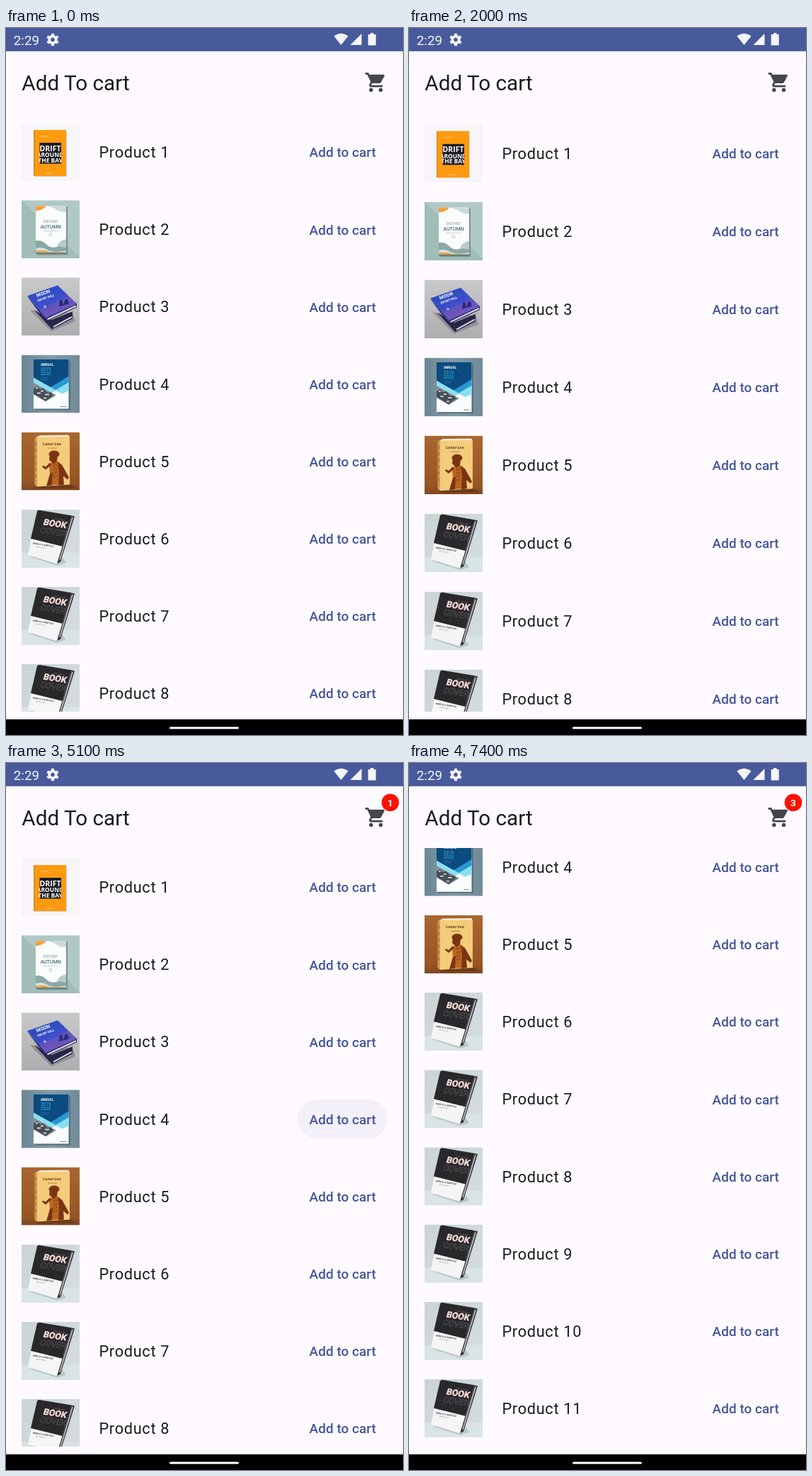
Write an HTML page that moves like this. It is 561x998 px and loops after 8 s.

```html
<!DOCTYPE html>
<html lang="en">
<head>
<meta charset="utf-8">
<title>Add To cart</title>
<style>
  html, body { margin: 0; width: 100%; height: 100%; overflow: hidden; background: #fefaff; }
  svg { display: block; }
  #stage { width: 561px; height: 998px; font-family: Roboto, sans-serif; }
  .name { font-size: 21.8px; letter-spacing: .66px; fill: #1b1b1f; }
  .add { font-size: 19px; font-weight: 500; fill: #45579a; }
  .mid { text-anchor: middle; }
  .bold { font-weight: 700; }
  .sans { font-family: "Open Sans", sans-serif; }
  .mono { font-family: "Liberation Mono", monospace; }
</style>
</head>
<body>
<svg id="stage" viewBox="0 0 561 998" xmlns="http://www.w3.org/2000/svg">
  <defs>
    <clipPath id="listArea"><rect y="120" width="561" height="845"/></clipPath>
    <linearGradient id="desk" x2="0" y2="1"><stop stop-color="#c9c8ca"/><stop offset="1" stop-color="#aeadb0"/></linearGradient>
    <linearGradient id="night" x1="0" y1="0" x2=".7" y2="1"><stop stop-color="#2449b4"/><stop offset=".55" stop-color="#3a4fcb"/><stop offset="1" stop-color="#8a58b4"/></linearGradient>
    <linearGradient id="slate" x2="1" y2="0"><stop stop-color="#6b8795"/><stop offset=".5" stop-color="#849ba7"/><stop offset="1" stop-color="#718a98"/></linearGradient>
    <linearGradient id="wood" x2="0" y2="1"><stop stop-color="#a8672f"/><stop offset=".85" stop-color="#965524"/><stop offset="1" stop-color="#7f461f"/></linearGradient>
    <linearGradient id="mist" x2="1" y2="1"><stop stop-color="#c9d4d5"/><stop offset="1" stop-color="#d6dde0"/></linearGradient>

    <symbol id="cover1" viewBox="0 0 82 82">
      <rect width="82" height="82" fill="#f7f5f7"/>
      <rect x="18" y="11" width="46" height="65" fill="#d9d3cd"/>
      <rect x="17" y="10" width="46" height="65" fill="#fd9a10"/>
      <path d="M17.700 10v65" stroke="#c9842c" stroke-width="1.200"/>
      <path d="M26 19h12M35 71h10" stroke="#ffc878" stroke-width="1"/>
      <svg x="24.500" y="28" width="31.500" height="29.500">
        <rect x="1" width="31" height="30" fill="#1d1b22"/>
        <g class="sans bold mid" fill="#fff" font-size="8.500">
          <text x="16" y="11.500" font-size="10.500">DRIFT</text>
          <text x="16" y="19.800">AROUND</text>
          <text x="16" y="27.600">THE BAY</text>
        </g>
      </svg>
    </symbol>

    <symbol id="cover2" viewBox="0 0 82 82">
      <rect width="82" height="82" fill="#b0c9c4"/>
      <path d="M0 0L82 80V82H0Z" fill="#a0bdb7"/>
      <path d="M22 9h43v68H22Z" fill="#78918f"/>
      <rect x="20" y="8" width="43" height="67" fill="#fbfcfc"/>
      <path d="M20 8h15q-4 6-15 7Z" fill="#f0a23c"/>
      <path d="M35 8h28v9q-9 0-14-4-6-4-14-5Z" fill="#ccdada"/>
      <path d="M20 57q9-1 15 5t13 4q8-2 15-1v10H20Z" fill="#8ba8a9"/>
      <path d="M50 64q4-8 13-9v12Z" fill="#b9cbcb"/>
      <path d="M20 68q9-3 17 2t26 1v4H20Z" fill="#d5dfde"/>
      <path d="M20 71h14l5 2h24v2H20Z" fill="#e9a347"/>
      <path d="M20 74h43v1.500H20Z" fill="#4d7686"/>
      <text class="mid" x="41" y="32" font-size="5" fill="#789199">DISTANT</text>
      <text class="mid" x="41" y="40" font-size="7" font-weight="500" fill="#416c7b">AUTUMN</text>
      <path d="M30 43.500h22" stroke="#bac8cc" stroke-width=".8"/>
      <circle cx="41" cy="49" r="1.800" fill="none" stroke="#9bb1b5" stroke-width=".7"/>
    </symbol>

    <symbol id="cover3" viewBox="0 0 82 82">
      <rect width="82" height="82" fill="url(#desk)"/>
      <path d="M12 46L42 76 76 62 72 50Z" fill="#918f95"/>
      <path d="M18 46L43 73 72 58V48L42 60Z" fill="#262747"/>
      <path d="M45 69.500L71 55.500" stroke="#d9d7df" stroke-width="2"/>
      <path d="M8 27L35 62 78 42V36L34 55Z" fill="#262a66"/>
      <path d="M36.500 59L77 40" stroke="#dddbe6" stroke-width="2"/>
      <path d="M8 26L51 11 78 37 34 57Z" fill="url(#night)"/>
      <path d="M34 57L25 46 66 26 78 37Z" fill="#7657b8" opacity=".5"/>
      <path d="M53 41l1-9 3-1 2 8 3-9 3 1 2 6Z" fill="#272b78"/>
      <g transform="rotate(-19 24 28)" fill="#fff" class="bold">
        <text x="22" y="27" font-size="6.800">MOON</text>
        <text x="21" y="33.500" font-size="4.600">ON MY HILL</text>
      </g>
      <circle cx="33" cy="41" r="1.800" fill="#aeb9f0"/>
    </symbol>

    <symbol id="cover4" viewBox="0 0 82 82">
      <rect width="82" height="82" fill="url(#slate)"/>
      <path d="M19 8h50v70H19Z" fill="#58707e"/>
      <rect x="17" y="6" width="49.500" height="70" fill="#fafcfd"/>
      <path d="M17 6h49.500v25L41 46 17 33Z" fill="#0b4b80"/>
      <path d="M66.500 30v9L48 50 41 46Z" fill="#2699d3"/>
      <path d="M66.500 39v12L57 55 48 50Z" fill="#8ae0f2"/>
      <path d="M17 32L49 50 42 54 17 39Z" fill="#8ae0f2"/>
      <path d="M17 39L49 57 34 66 17 56Z" fill="#8a9197"/>
      <path d="M17 47l5-3 4 4 5-1 5 6 6 0 3 4-11 8-17-10Z" fill="#484f56"/>
      <path d="M20 47h3M27 51h4M22 54h5M33 56h6M31 61h4" stroke="#d9dfe2" stroke-width="1.600"/>
      <path d="M55 73h8" stroke="#668899" stroke-width="1"/>
      <text x="27" y="15.500" font-size="4.600" class="bold" fill="#fff">ANNUAL</text>
      <g font-size="6.400" fill="#39b8df"><text x="27" y="23">2019</text><text x="27" y="29">2020</text></g>
      <path d="M27 32.500h12M27 35h10" stroke="#2b77a5" stroke-width=".8"/>
    </symbol>

    <symbol id="cover5" viewBox="0 0 82 82">
      <rect width="82" height="82" fill="url(#wood)"/>
      <path d="M16 74L70 74 78 79 24 80Z" fill="#6d3b19"/>
      <path d="M19 8L26 4.500 66 4 68 7Z" fill="#f4e8d5"/>
      <path d="M18.500 8L22 7V77L18.500 75Z" fill="#d29f55"/>
      <path d="M22 7L68 6.500V74L22 77Z" fill="#f5cb7c"/>
      <path d="M20 14v55" stroke="#8a5a2a" stroke-width="1" stroke-dasharray="5 4"/>
      <text class="mono bold mid" x="43" y="18" font-size="5.400" fill="#57310f">Lunarios</text>
      <path d="M37 22.500h13" stroke="#a47235" stroke-width=".8"/>
      <path d="M39 46L46 40 53 42 55 54 54 74 37 75 40 60Z" fill="#b9661f"/>
      <g fill="#7a3412">
        <ellipse cx="46" cy="31" rx="7.500" ry="5"/>
        <path d="M40 32L51 33 50 41 45 45 39 39Z"/>
        <path d="M51 42L57 46 67 64 65 67 59 62 60 74 52 75 53 56Z"/>
        <path d="M40 59L44 57 43 75 35 76Z"/>
        <path d="M42 46L34 53 29 49 30 47 34 49 40 43Z"/>
      </g>
      <path d="M46 46v18M49 45v18" stroke="#7a3412" stroke-width="1" stroke-dasharray="3 2"/>
    </symbol>

    <symbol id="cover6" viewBox="0 0 82 82">
      <rect width="82" height="82" fill="url(#mist)"/>
      <rect y="61" width="82" height="21" fill="#d9e4e4"/>
      <path d="M10 66L50 79 63 75 58 68Z" fill="#b9c6c8"/>
      <path d="M70 8.500L75 9.500 55 74 49 76.500Z" fill="#323235"/>
      <path d="M72 11L54 71" stroke="#c3c5c8" stroke-width="1.600"/>
      <path d="M22 2.500Q23 .5 26 1L71 8.500 50 76.500 9 64Z" fill="#f5f5f6"/>
      <path d="M22 2.500Q23 .5 26 1L71 8.500 57.500 52 13 41Z" fill="#29282b"/>
      <g transform="translate(30 21.500) rotate(9) skewX(-8)">
        <text x="12" y="-10" font-size="2.800" fill="#7c7a7d">TWO HALVES</text>
        <text class="bold" font-size="12.400" fill="#f8dcda" stroke="#f8dcda" stroke-width=".4">BOOK</text>
        <text x="-1" y="11.500" font-size="11.500" fill="none" stroke="#8c8a8f" stroke-width=".5" stroke-dasharray="1 1.200">COVER</text>
        <text x="-6" y="29" font-size="3.200" class="bold" fill="#3e3d42">HERE IS A SUBTITLE</text>
        <text x="0" y="33" font-size="2.400" fill="#88878c">WRITTEN BY</text>
      </g>
    </symbol>
  </defs>

  <rect width="561" height="998" fill="#fefaff"/>
  <g clip-path="url(#listArea)"><g id="list"></g></g>

  <rect width="561" height="32.800" fill="#485a9b"/>
  <g fill="#f4f5fb">
    <text x="10.800" y="23.500" font-size="18.800">2:29</text>
    <g transform="translate(66 16.500)" fill="none" stroke="#f4f5fb">
      <circle r="4.800" stroke-width="3.800"/>
      <circle r="7.300" stroke-width="3" pathLength="12" stroke-dasharray="1" stroke-dashoffset=".5" transform="rotate(30)"/>
    </g>
    <path d="M473.500 24L463.500 11.500Q473.500 4 483.500 11.500Z"/>
    <path d="M502.500 8V24H486.500Z"/>
    <path d="M515 7h4.500v2h3.200v15.500h-11V9h3.300Z"/>
  </g>
  <text x="22.300" y="88" font-size="29.700" fill="#1b1b1f">Add To cart</text>
  <path transform="translate(506.300 60.300) scale(1.364)" fill="#46454b" d="M7 18a2 2 0 1 0 0 4a2 2 0 0 0 0-4zM1 2v2h2l3.600 7.590-1.350 2.450C4.520 15.370 5.480 17 7 17h12v-2H7.420c-.14 0-.25-.11-.25-.25l.03-.12.9-1.630h7.450c.75 0 1.410-.41 1.750-1.030l3.580-6.490A1 1 0 0 0 20 4H5.210l-.94-2zM17 18a2 2 0 1 0 0 4a2 2 0 0 0 0-4z"/>
  <g id="badge">
    <circle cx="543" cy="55.800" r="12.300" fill="#fb1200"/>
    <text id="count" class="mid bold" x="543" y="61" font-size="13.600" fill="#fff"></text>
  </g>
  <use id="flyer" x="-41" y="-41" width="82" height="82"/>

  <rect y="974.500" width="561" height="1.500" fill="#dedce1"/>
  <rect y="976" width="561" height="22" fill="#000"/>
  <rect x="231" y="986.500" width="98" height="3" rx="1.500" fill="#fff"/>
</svg>
<script>
const LOOP = 8000, STEP = 100, PITCH = 109.14, ROWS = 11;
const $ = id => document.getElementById(id);

// [time, value] tables
const SCROLL = [[1300, 0], [1400, 5.6], [1500, 42], [1600, 92], [1700, 112], [1800, 72], [1900, 18], [2000, 0],
  [6700, 0], [6800, 60], [6900, 170], [7000, 256.8], [7100, 304], [7200, 332], [7300, 348], [7400, 355.6]];
const STRETCH = [[1900, 0], [2000, .0083], [2100, .011], [2200, .0105], [2400, .004], [2600, 0]];
const RIPPLE = [[-100, 0], [0, .06], [100, .11], [400, .11], [700, .03], [800, 0]];

const TAPS = [{ at: 3700, row: 0 }, { at: 5100, row: 3 }, { at: 6300, row: 6 }];
const ARRIVE = 300, CART = { x: 530.7, y: 76.6 };

const mix = (a, b, k) => a + (b - a) * k;
const clamp = k => Math.min(1, Math.max(0, k));

function sample(table, t) {
  const i = table.findIndex(([time]) => time > t);
  if (i === 0) return table[0][1];
  if (i < 0) return table[table.length - 1][1];
  const [t0, a] = table[i - 1], [t1, b] = table[i];
  return mix(a, b, (t - t0) / (t1 - t0));
}

const cover = row => '#cover' + Math.min(row + 1, 6);

$('list').innerHTML = Array.from({ length: ROWS }, (_, i) => `
  <g transform="translate(0 ${(i * PITCH).toFixed(2)})">
    <use href="${cover(i)}" x="22" y="134" width="82" height="82"/>
    <text class="name" x="131.4" y="183.2">Product ${i + 1}</text>
    <rect class="ripple" x="412" y="147.7" width="127.3" height="54.6" rx="27.3" fill="#46589a" opacity="0"/>
    <text class="add" x="428.6" y="182.4">Add to cart</text>
  </g>`).join('');
const ripples = document.querySelectorAll('.ripple');

// The picked cover hops up, then spins and shrinks into the cart.
function drawFlight(t) {
  const tap = TAPS.find(({ at }) => t >= at && t <= at + ARRIVE);
  const flyer = $('flyer');
  flyer.style.display = tap ? '' : 'none';
  if (!tap) return;
  const p = t - tap.at;
  const hop = clamp(p / 100) * 16;
  const k = clamp((p - 100) / (ARRIVE - 100)) ** 1.6;
  const x = mix(63, CART.x, k);
  const y = mix(175 + tap.row * PITCH - hop, CART.y, k);
  flyer.setAttribute('href', cover(tap.row));
  flyer.setAttribute('transform', `translate(${x} ${y}) rotate(${360 * k}) scale(${mix(1, .5, k)})`);
}

function draw(t) {
  const k = sample(STRETCH, t);
  const top = 120 + 150 * k;
  $('list').setAttribute('transform',
    `translate(0 ${top}) scale(1 ${1 + k}) translate(0 ${-120 - sample(SCROLL, t)})`);
  for (const { at, row } of TAPS) ripples[row].setAttribute('opacity', sample(RIPPLE, t - at));
  const count = TAPS.filter(({ at }) => t >= at + ARRIVE).length;
  $('badge').style.display = count ? '' : 'none';
  $('count').textContent = count;
  drawFlight(t);
}

// The picture advances ten times a second.
const start = performance.now();
function tick() {
  const t = (performance.now() - start) % LOOP;
  draw(Math.floor(t / STEP) * STEP);
  requestAnimationFrame(tick);
}
tick();
</script>
</body>
</html>
```
